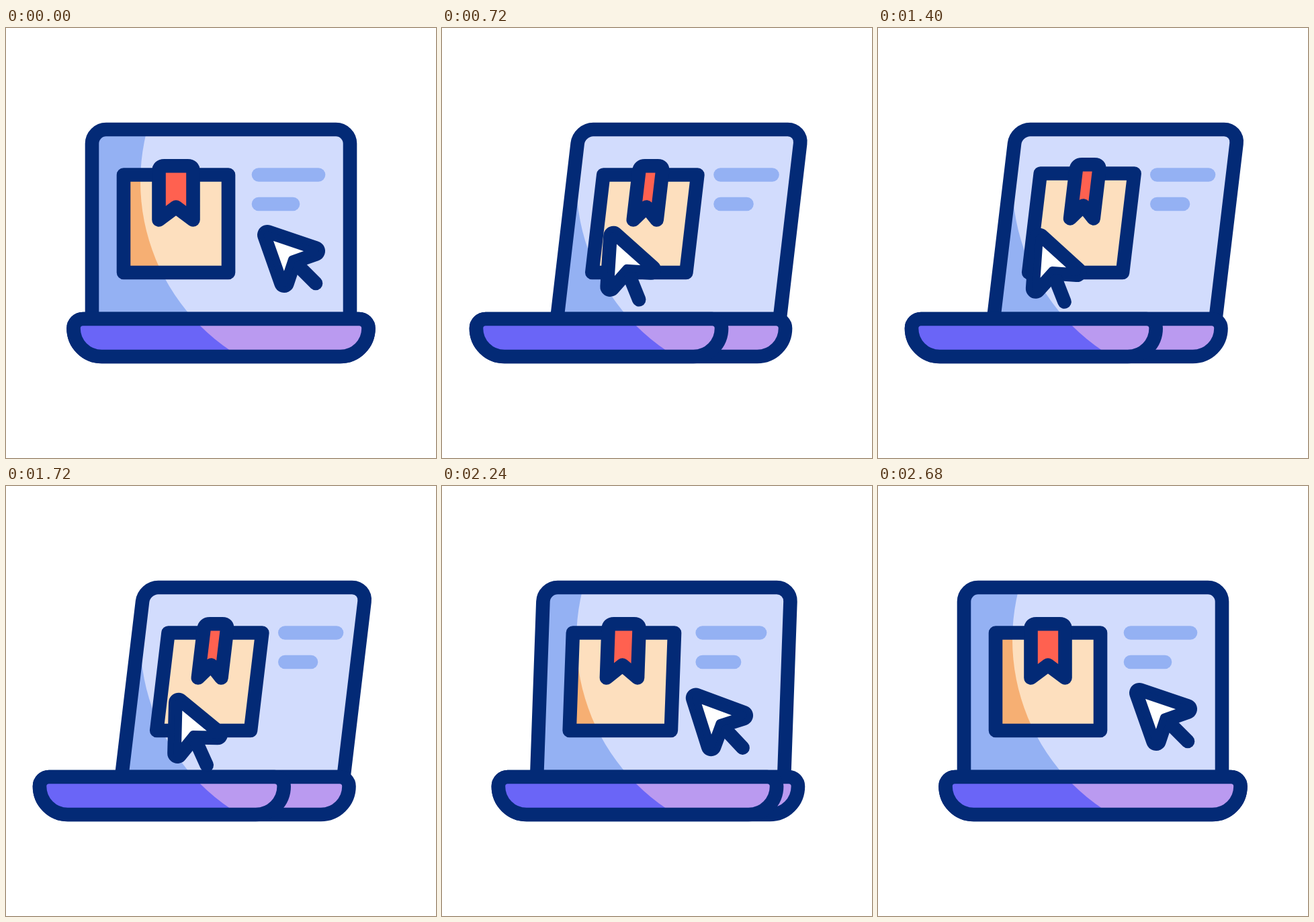
Recreate the animation shown at these times as an HTML page with a canvas. Size 640 by 640 pixels, loop 3000 ms.

```html
<!DOCTYPE html>
<html lang="en">
<head>
<meta charset="utf-8">
<title>Laptop order</title>
<style>
  html, body { margin: 0; width: 100%; height: 100%; overflow: hidden; background: #fff; }
  canvas { display: block; width: 100vmin; height: 100vmin; margin: auto; }
</style>
</head>
<body>
<canvas id="stage" width="640" height="640"></canvas>
<script>
const ctx = document.getElementById('stage').getContext('2d');
const LOOP = 3000, LINE = 20.6, FLOOR = 433;
const NAVY = '#032a76', SKY = '#d2dcfd', BLUE = '#94b1f3', CREAM = '#fddfbe',
      ORANGE = '#f6af73', RED = '#ff6150', LILAC = '#ba9af0', VIOLET = '#6a65f7';

const clamp = v => Math.min(1, Math.max(0, v));
const lerp = (a, b, p) => a + (b - a) * p;
const span = (t, a, b) => clamp((t - a) / (b - a));
const smooth = (t, a, b) => { const v = span(t, a, b); return v * v * (3 - 2 * v); };

function bezier(x1, y1, x2, y2) {
  const at = (s, a, b) => 3 * (1 - s) * (1 - s) * s * a + 3 * (1 - s) * s * s * b + s * s * s;
  return x => {
    let lo = 0, hi = 1;
    for (let i = 0; i < 24; i++) {
      const mid = (lo + hi) / 2;
      if (at(mid, x1, x2) < x) lo = mid; else hi = mid;
    }
    return at(lo, y1, y2);
  };
}
const turnOut = bezier(.25, .1, .6, 1);
const turnBack = bezier(.3, .1, .4, 1);

function stroke(path, width = LINE, color = NAVY) {
  ctx.lineWidth = width;
  ctx.strokeStyle = color;
  ctx.stroke(path);
}

// Fill with the shade colour, then light it inside the large fixed circle.
function shaded(path, light, dark) {
  ctx.save();
  ctx.fillStyle = dark;
  ctx.fill(path);
  ctx.clip(path);
  ctx.fillStyle = light;
  ctx.beginPath();
  ctx.arc(503.2, 228.6, 303.2, 0, Math.PI * 2);
  ctx.fill();
  ctx.restore();
  stroke(path);
}

function polygon(points) {
  const path = new Path2D();
  points.forEach(([x, y]) => path.lineTo(x, y));
  path.closePath();
  return path;
}

function line(x1, y1, x2, y2, color) {
  const path = new Path2D();
  path.moveTo(x1, y1);
  path.lineTo(x2, y2);
  stroke(path, LINE, color);
}

function drawScreen(p, lean) {
  const l = lerp(128, 172, p), r = lerp(512, 502.5, p), top = 151, c = 21, k = c * .45;
  const at = (x, y) => [lean(x, y), y];
  const path = new Path2D();
  path.moveTo(l, FLOOR);
  path.lineTo(...at(l, top + c));
  path.bezierCurveTo(...at(l, top + k), ...at(l + k, top), ...at(l + c, top));
  path.lineTo(...at(r - c, top));
  path.bezierCurveTo(...at(r - k, top), ...at(r, top + k), ...at(r, top + c));
  path.lineTo(r, FLOOR);
  path.closePath();
  shaded(path, SKY, BLUE);

  const x = lerp(376, 415.3, p);
  line(x, 218.5, lerp(465, 492, p), 218.5, BLUE);
  line(x, 262, lerp(427, 454, p), 262, BLUE);
}

function drawBase(l, r) {
  const path = new Path2D();
  path.moveTo(l + 14, FLOOR);
  path.lineTo(r - 14, FLOOR);
  path.arc(r - 14, FLOOR + 14, 14, -Math.PI / 2, 0);
  path.arc(r - 42, FLOOR + 14, 42, 0, Math.PI / 2);
  path.arc(l + 42, FLOOR + 14, 42, Math.PI / 2, Math.PI);
  path.arc(l + 14, FLOOR + 14, 14, Math.PI, Math.PI * 1.5);
  path.closePath();
  shaded(path, LILAC, VIOLET);
}

function drawBox(p, lean, lift) {
  const l = lerp(175, 216, p), r = lerp(331, 355.8, p);
  const at = (x, y) => [lean(x, y), y];
  shaded(polygon([at(l, 364), at(l, 218.5 - lift), at(r, 218.5 - lift), at(r, 364)]), CREAM, ORANGE);

  const mid = lerp(253, 285.6, p), half = lerp(25.5, 17.3, p);
  const tl = mid - half, tr = mid + half;
  const tag = (x, y) => at(x, y - lift);
  const path = new Path2D();
  path.moveTo(...tag(tl, 285.5));
  path.lineTo(...tag(tl, 213));
  path.quadraticCurveTo(...tag(tl, 205.3), ...tag(tl + 8, 205.3));
  path.lineTo(...tag(tr - 8, 205.3));
  path.quadraticCurveTo(...tag(tr, 205.3), ...tag(tr, 213));
  path.lineTo(...tag(tr, 285.5));
  path.lineTo(...tag(mid, 266.5));
  path.closePath();
  ctx.fillStyle = RED;
  ctx.fill(path);
  stroke(path);
}

const arrow = polygon([[-42, -42], [29, -18], [-5.4, -5.8], [-17, 29]]);

function drawCursor(x, y, angle) {
  ctx.save();
  ctx.translate(x, y);
  ctx.rotate(angle * Math.PI / 180);
  stroke(arrow, 30);
  line(2, 2, 30, 30, NAVY);
  ctx.fillStyle = '#fff';
  ctx.fill(arrow);
  stroke(arrow, 11.2);
  ctx.restore();
}

function draw(t) {
  const back = t > 1200;
  const turn = begin => back
    ? 1 - turnBack(span(t, begin, begin + 830))
    : turnOut(span(t, 200, 780));
  const p = turn(1832), slide = turn(1850);
  const lean = (x, y) => x + .119 * p * (FLOOR - y);
  const lift = 17.5 * (smooth(t, 840, 1110) - smooth(t, 1110, 1480));

  ctx.clearRect(0, 0, 640, 640);
  ctx.lineJoin = ctx.lineCap = 'round';
  drawScreen(p, lean);
  const left = lerp(100.5, 50, slide);
  drawBase(left, lerp(539.5, 510.5, slide));
  drawBase(left, lerp(539.5, 413.7, slide));
  drawBox(p, lean, lift);

  // The pointer swings in along one arc and leaves along a deeper one.
  const u = back ? 1 - smooth(t, 1545, 2380) : smooth(t, 200, 840);
  const drop = 10 + 8 * smooth(t, 840, 1000);
  const bend = back ? 27 : 17.5;
  drawCursor(431 - 169 * u, 350 + drop * u + 4 * bend * u * (1 - u), 23.5 * (back ? u : p));
}

const start = performance.now();
function tick() {
  draw((performance.now() - start) % LOOP);
  requestAnimationFrame(tick);
}
tick();
</script>
</body>
</html>
```
